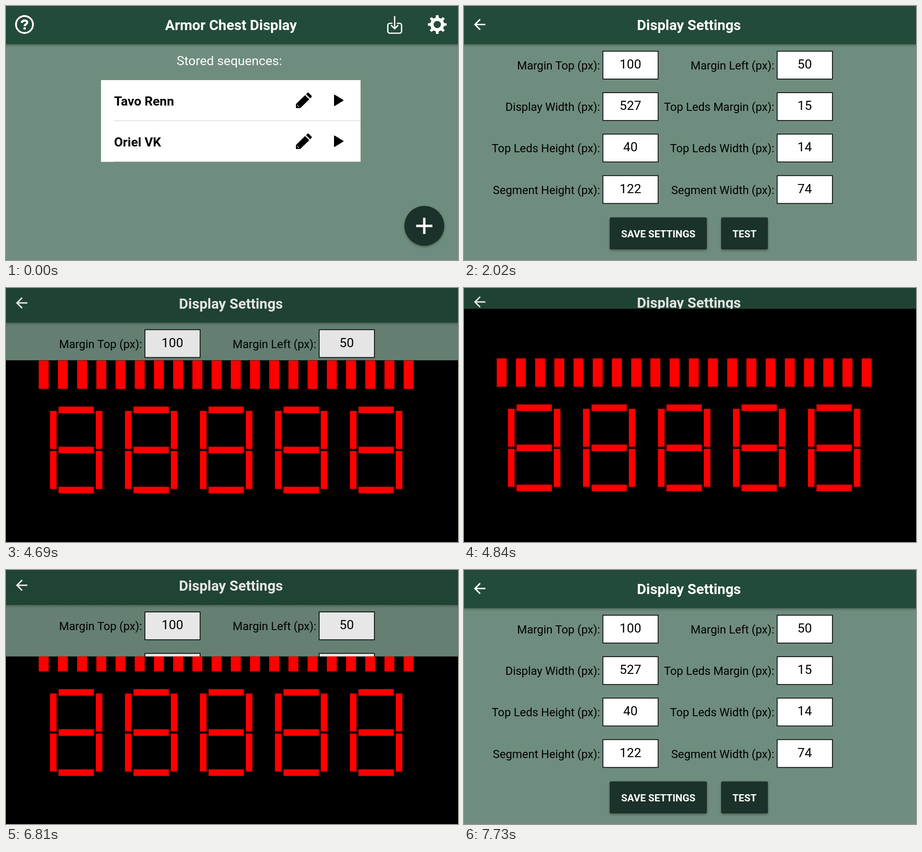
Animation, 937 px wide and 528 px high, one loop 8 s. Source, as an HTML page with a canvas:

```html
<!DOCTYPE html>
<html lang="en">
<head>
<meta charset="utf-8">
<title>Chest display settings</title>
<style>
  html, body { margin: 0; width: 100%; height: 100%; overflow: hidden; background: #000; }
  canvas { display: block; }
</style>
</head>
<body>
<canvas id="stage" width="937" height="528"></canvas>
<script>
const W = 937, H = 528, LOOP = 8000;
const ctx = document.getElementById('stage').getContext('2d');
const HEADER = '#234b39', BODY = '#6f8d7e', DARK = '#1a3229', RED = '#ff0000';
const clamp = v => Math.max(0, Math.min(1, v));

// Screen updates arrive in short bursts: [first, last, count]
const BURSTS = [
  [0, 0, 1], [1230, 1470, 4], [1620, 2020, 6], [4300, 4690, 6],
  [4770, 5010, 4], [6640, 6810, 3], [6870, 7260, 6]
];
const GEAR_PRESS = 1160, OPEN_SETTINGS = 1595;
const TEST_PRESS = 4228, OPEN_DISPLAY = 4595, CLOSE_DISPLAY = 6742;
const SLIDE = 425;

function heldTime(t) {
  const [first, last, count] = BURSTS.filter(b => b[0] <= t + 0.01).pop();
  if (count === 1) return first;
  const step = (last - first) / (count - 1);
  return Math.min(last, first + step * Math.floor((t - first) / step + 0.001));
}

function bezier(x, x0, y0, x1, y1, x2, y2, x3, y3) {
  const at = (u, a, b, c, d) => {
    const v = 1 - u;
    return a * v * v * v + 3 * b * v * v * u + 3 * c * v * u * u + d * u * u * u;
  };
  let lo = 0, hi = 1;
  for (let i = 0; i < 24; i++) {
    const mid = (lo + hi) / 2;
    if (at(mid, x0, x1, x2, x3) < x) lo = mid; else hi = mid;
  }
  return at(lo, y0, y1, y2, y3);
}

function slideEase(x) {
  if (x <= 0) return 0;
  if (x >= 1) return 1;
  return x < 1 / 6
    ? bezier(x, 0, 0, 0.05, 0, 0.13333, 0.06, 1 / 6, 0.4)
    : bezier(x, 1 / 6, 0.4, 0.20833, 0.82, 0.25, 1, 1, 1);
}
const standardEase = x => bezier(clamp(x), 0, 0, 0.4, 0, 0.2, 1, 1, 1);
const dimEase = x => bezier(clamp(x), 0, 0, 0.33, 0, 1, 1, 1, 1);

function rect(x, y, w, h, color) {
  ctx.fillStyle = color;
  ctx.fillRect(x, y, w, h);
}

function text(str, x, y, size, color, align = 'center', weight = 400) {
  ctx.font = `${weight} ${size}px Roboto, sans-serif`;
  ctx.textAlign = align;
  ctx.fillStyle = color;
  ctx.fillText(str, x, y);
}

function fillPath(d, color) {
  ctx.fillStyle = color;
  ctx.fill(new Path2D(d));
}

function strokePath(d, width, color, cap = 'butt') {
  ctx.lineWidth = width;
  ctx.strokeStyle = color;
  ctx.lineCap = cap;
  ctx.lineJoin = 'round';
  ctx.stroke(new Path2D(d));
}

function circle(x, y, r, color) {
  ctx.fillStyle = color;
  ctx.beginPath();
  ctx.arc(x, y, r, 0, Math.PI * 2);
  ctx.fill();
}

function withShadow(draw) {
  ctx.save();
  ctx.shadowColor = 'rgba(0,0,0,0.35)';
  ctx.shadowBlur = 5;
  ctx.shadowOffsetY = 2;
  draw();
  ctx.restore();
}

function ripple(x, y, r0, r1, age, fadeStart) {
  const alpha = 0.26 * clamp(age / 70) * (1 - clamp((age - fadeStart) / 150));
  if (alpha <= 0) return;
  const r = r0 + (r1 - r0) * standardEase(age / 225);
  circle(x, y, r, `rgba(255,255,255,${alpha})`);
}

function page(title) {
  rect(0, 0, W, H, BODY);
  const shade = ctx.createLinearGradient(0, 79, 0, 86);
  shade.addColorStop(0, 'rgba(0,0,0,0.22)');
  shade.addColorStop(1, 'rgba(0,0,0,0)');
  rect(0, 79, W, 7, shade);
  rect(0, 0, W, 79.5, HEADER);
  text(title, 466.3, 50, 29.6, '#fff', 'center', 700);
}

function gear(x, y) {
  const teeth = 8, pitch = Math.PI * 2 / teeth;
  ctx.fillStyle = '#fff';
  ctx.beginPath();
  for (let i = 0; i < teeth; i++) {
    for (const [r, a] of [[14.6, -0.27], [19.6, -0.17], [19.6, 0.17], [14.6, 0.27]]) {
      const angle = (i + a) * pitch;
      ctx.lineTo(x + r * Math.cos(angle), y + r * Math.sin(angle));
    }
  }
  ctx.closePath();
  ctx.moveTo(x + 7.6, y);
  ctx.arc(x, y, 7.6, 0, Math.PI * 2);
  ctx.fill('evenodd');
}

function listRow(name, y) {
  text(name, 224, y + 53, 26.6, '#000', 'left', 700);
  ctx.save();
  ctx.translate(601, y + 26);
  fillPath('M0 24 L19 5.3 L27.7 14 L9 32.2 H0 Z', '#000');
  fillPath('M2.5 25 L7.3 29.8 H4.8 V27.5 H2.5 Z', '#fff');
  fillPath('M21 3.5 L23.6 .9 Q25.2 -.7 26.8 .9 L32.2 6.3 Q33.7 7.8 32.2 9.4 L29.6 12 Z', '#000');
  ctx.restore();
  fillPath(`M680 ${y + 31} Q680 ${y + 29.8} 681.5 ${y + 30.5} L699 ${y + 41} Q700.6 ${y + 42} 699 ${y + 43} L681.5 ${y + 53.8} Q680 ${y + 54.5} 680 ${y + 53} Z`, '#000');
  rect(224, y + 84, 511, 1, '#cfcfcf');
}

function home(t) {
  page('Armor Chest Display');
  strokePath('M55.9 38.5 A17.6 17.6 0 1 1 20.7 38.5 A17.6 17.6 0 1 1 55.9 38.5', 3.7, '#fff');
  strokePath('M32.2 34.8 Q34.2 30.2 38.6 30.2 Q44 30.3 44 34.3 C44 38 38.7 37.8 38.7 42', 4.4, '#fff');
  circle(38.6, 46.6, 2.6, '#fff');
  strokePath('M800 36 H795.5 a4 4 0 0 0 -4 4 V52.5 a4 4 0 0 0 4 4 H816 a4 4 0 0 0 4 -4 V40 a4 4 0 0 0 -4 -4 H811.5', 2.7, '#fff', 'round');
  strokePath('M805.7 22 V46.5 M799 40.5 L805.7 47.2 L812.4 40.5', 2.7, '#fff', 'round');
  gear(894, 38.5);
  ripple(894, 38.5, 18, 37, t - GEAR_PRESS, 160);

  text('Stored sequences:', 463, 123, 26.6, '#fff');
  rect(197, 154, 538, 170, '#fff');
  listRow('Tavo Renn', 154);
  listRow('Oriel VK', 239);

  withShadow(() => circle(867.2, 457, 41.4, DARK));
  rect(850.3, 454.6, 33.6, 5, '#fff');
  rect(864.6, 440.3, 5, 33.6, '#fff');
}

function field(label, value, x, row) {
  const y = 94 + row * 86.2;
  text(label + ' (px):', x - 6, y + 38, 23.7, '#000', 'right');
  rect(x - 0.8, y - 0.8, 116, 59.4, '#000');
  rect(x + 0.8, y + 0.8, 112.8, 56.2, '#fff');
  text(value, x + 57, y + 36, 26.6, '#000');
}

function button(label, x, w, after) {
  const box = new Path2D();
  box.roundRect(x, 439.5, w, 66.5, 3);
  ctx.fillStyle = DARK;
  withShadow(() => ctx.fill(box));
  if (after) {
    ctx.save();
    ctx.clip(box);
    after();
    ctx.restore();
  }
  text(label, x + w / 2, 481, 20.7, '#fff', 'center', 700);
}

function settings(t) {
  page('Display Settings');
  ctx.save();
  ctx.translate(14.7, 20.7);
  ctx.scale(1.48, 1.48);
  fillPath('M20 11H7.83l5.59-5.59L12 4l-8 8 8 8 1.41-1.41L7.83 13H20v-2z', '#fff');
  ctx.restore();
  [['Margin Top', 100, 'Margin Left', 50],
   ['Display Width', 527, 'Top Leds Margin', 15],
   ['Top Leds Height', 40, 'Top Leds Width', 14],
   ['Segment Height', 122, 'Segment Width', 74]
  ].forEach(([left, a, right, b], row) => {
    field(left, a, 288, row);
    field(right, b, 649.3, row);
  });
  button('SAVE SETTINGS', 302, 201.5);
  button('TEST', 533, 97, () => ripple(581.5, 473, 29, 59, t - TEST_PRESS, 180));
}

function display() {
  rect(0, 0, W, H, '#000');
  for (let i = 0; i < 20; i++) rect(67.8 + i * 39.82, 144.5, 20.6, 59, RED);
  for (let i = 0; i < 5; i++) {
    const x = 91.2 + i * 155.45;
    for (const y of [240.3, 323.7, 407]) rect(x + 17.7, y, 73.2, 13.6, RED);
    for (const y of [249.3, 332.7])
      for (const dx of [0, 95]) rect(x + dx, y, 13.6, 78.9, RED);
  }
}

// Stacks two screens: `shown` is how far the upper one has come in
function stack(lower, upper, shown, dim, t) {
  ctx.save();
  ctx.translate(0, -0.0195 * H * shown);
  lower(t);
  rect(0, 0, W, H, `rgba(0,0,0,${0.1 * dim})`);
  ctx.restore();
  ctx.save();
  ctx.beginPath();
  ctx.rect(0, H * (1 - shown), W, H);
  ctx.clip();
  ctx.translate(0, 0.041 * H * (1 - shown));
  upper(t);
  ctx.restore();
}

function openOver(lower, upper, start, t) {
  const age = t - start;
  stack(lower, upper, slideEase(age / SLIDE), clamp(age / 95), t);
}

function render(t) {
  rect(0, 0, W, H, '#000');
  if (t < OPEN_SETTINGS) home(t);
  else if (t < OPEN_SETTINGS + SLIDE) openOver(home, settings, OPEN_SETTINGS, t);
  else if (t < OPEN_DISPLAY) settings(t);
  else if (t < 5005) openOver(settings, display, OPEN_DISPLAY, t);
  else if (t < CLOSE_DISPLAY) display();
  else if (t < CLOSE_DISPLAY + SLIDE) {
    const x = (t - CLOSE_DISPLAY) / SLIDE;
    stack(settings, display, 1 - slideEase(x), 1 - dimEase(x), t);
  } else settings(t);
}

function tick(now) {
  render(heldTime(now % LOOP));
  requestAnimationFrame(tick);
}
render(0);
requestAnimationFrame(tick);
</script>
</body>
</html>
```
